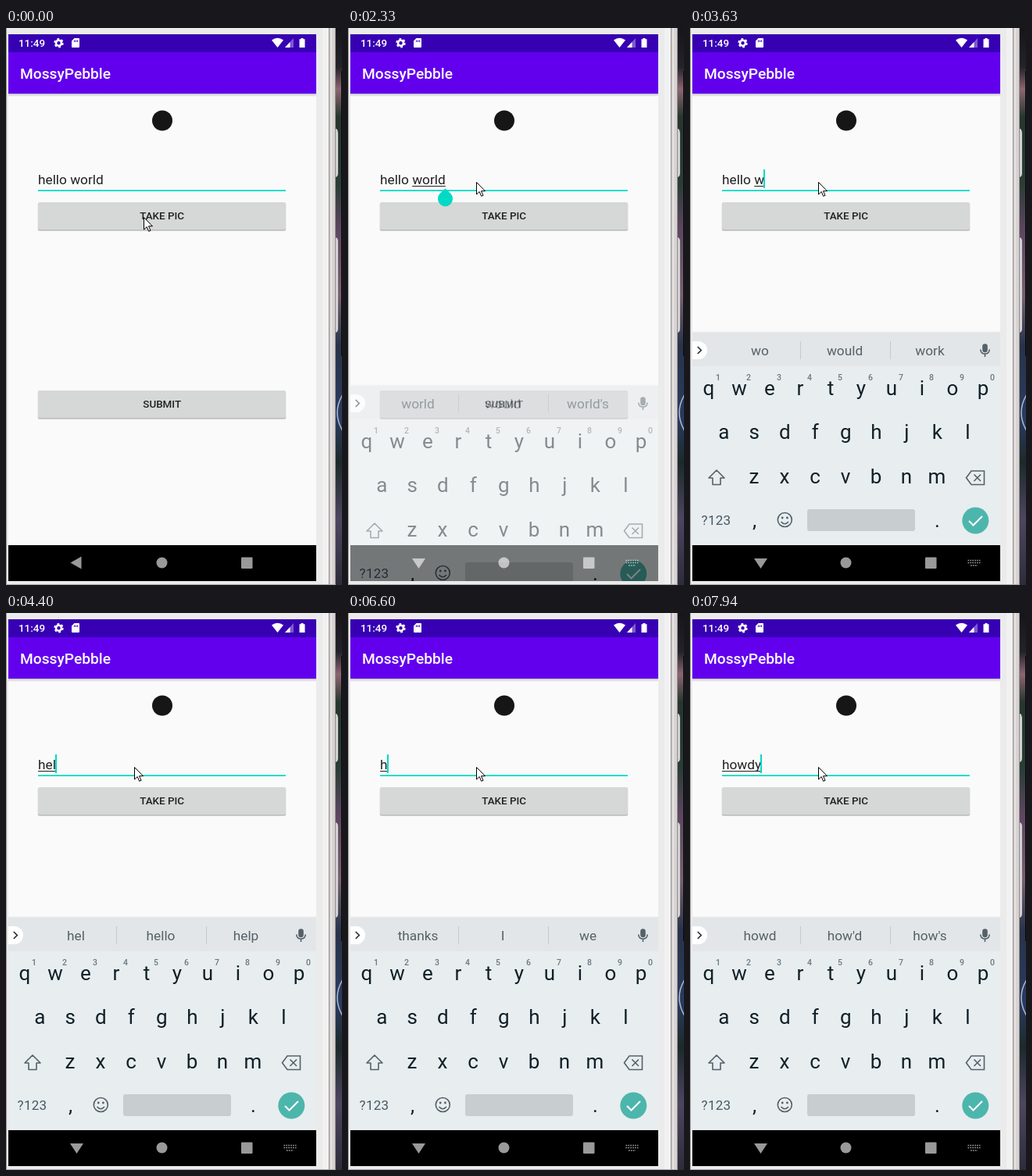
An HTML page that plays this animation: 430x713 px, repeating every 8000 ms.

```html
<!DOCTYPE html>
<html lang="en">
<head>
<meta charset="utf-8">
<title>Caption typing</title>
<style>
  html, body { margin: 0; width: 100%; height: 100%; overflow: hidden; background: #ebebeb; }
  svg { position: absolute; left: 0; top: 0; font-family: Roboto, sans-serif; }
  #field {
    position: absolute; left: 41px; top: 182px; height: 24px; display: flex;
    font: 17.25px/24px Roboto, sans-serif; color: #212121; white-space: pre;
  }
  #field u { text-decoration: underline 1px; text-underline-offset: 1.5px; text-decoration-skip-ink: none; }
  #caret { width: 2px; height: 24px; margin: -1px -2px 0 -1px; background: #03dac5; }
  #hint { position: absolute; left: 0; color: #9a9a9a; }
  .medium { font-weight: 500; }
  .mid { text-anchor: middle; }
</style>
</head>
<body>
<svg width="430" height="713" viewBox="0 0 430 713">
  <defs>
    <clipPath id="screen"><path d="M3 8H397V708H3Z"/></clipPath>
    <linearGradient id="shade" x2="0" y2="1">
      <stop stop-color="#000" stop-opacity=".22"/><stop offset="1" stop-color="#000" stop-opacity="0"/>
    </linearGradient>
    <linearGradient id="photo" x2="0" y2="1">
      <stop stop-color="#17151a"/><stop offset=".07" stop-color="#23232a"/>
      <stop offset=".11" stop-color="#8c6672"/><stop offset=".16" stop-color="#26362f"/>
      <stop offset=".28" stop-color="#2a3d36"/><stop offset=".36" stop-color="#5c4660"/>
      <stop offset=".48" stop-color="#77616f"/><stop offset=".57" stop-color="#28334a"/>
      <stop offset=".7" stop-color="#2b3b5f"/><stop offset=".78" stop-color="#1c2a2b"/>
      <stop offset=".88" stop-color="#4d4660"/><stop offset="1" stop-color="#2d2c3b"/>
    </linearGradient>
    <g id="button">
      <rect x="40.5" y="1" width="318" height="36" rx="2" fill="#000" opacity=".1"/>
      <rect x="41" y=".8" width="317" height="35.6" rx="2" fill="#000" opacity=".16"/>
      <rect x="41" width="317" height="35" rx="2" fill="#d6d7d7"/>
    </g>
  </defs>

  <!-- window frame and desktop strip -->
  <path d="M0 0H430V713H0Z" fill="#ebebeb"/>
  <path d="M0 0H1V713H0Z" fill="#9c9c9c"/>
  <path d="M405 0H413V713H405Z" fill="#f1f1f1"/>
  <path d="M413 0H422V713H413Z" fill="#d8d3d3"/>
  <path d="M413.5 0V713M421.5 0V713" stroke="#918b8b"/>
  <path d="M416.5 0V713" stroke="#eeeaea"/>
  <path d="M422 0H430V713H422Z" fill="url(#photo)"/>
  <path d="M422 129h1q2 2 2 5v52q0 4-3 5ZM422 268q3 1 3 5v112q0 4-3 5Z" fill="#d2d0d3"/>
  <path d="M429.5 55V420" stroke="#08080a"/>
  <path d="M431 469Q417 492 431 516" fill="none" stroke="#a9b9d4" stroke-width="1.5"/>
  <path d="M0 712.5H422" stroke="#a5a5a5"/>

  <g clip-path="url(#screen)">
    <path d="M3 8H397V662H3Z" fill="#fafafa"/>
    <path d="M3 84H397V88H3Z" fill="url(#shade)"/>
    <path d="M3 31H397V84H3Z" fill="#6200ee"/>
    <path d="M3 8H397V31H3Z" fill="#3700b3"/>
    <g fill="#fff">
      <text class="medium" x="16" y="24.3" font-size="13.4">11:49</text>
      <g fill="none" stroke="#fff">
        <circle cx="67.5" cy="19.2" r="3.5" stroke-width="2.6"/>
        <circle cx="67.5" cy="19.2" r="5.3" stroke-width="1.8" stroke-dasharray="2.8 2.75"/>
      </g>
      <path fill-rule="evenodd" d="M87.5 13H93q1 0 1 1V24q0 1-1 1H85q-1 0-1-1V16.500ZM87 15.500v2.500h1v-2.500ZM89 15.500v2.500h1v-2.500ZM91 15.500v2.500h1v-2.500Z"/>
      <path d="M340 15.500Q347.500 10 355 15.500L347.500 25Z"/>
      <path d="M368 13V25H357Z" opacity=".35"/>
      <path d="M363.500 18V25H357Z"/>
      <path d="M377.500 13H380.500V14.300H382.500V25H375.500V14.300H377.500Z"/>
      <text class="medium" x="18" y="65" font-size="19.17">MossyPebble</text>
    </g>

    <circle cx="200" cy="118.500" r="13" fill="#161616"/>
    <path d="M41 207.200H358V209H41Z" fill="#03dac5"/>
    <use href="#button" y="223"/>
    <use href="#button" y="464"/>
    <g class="medium mid" font-size="13.42" fill="#212121">
      <text x="199.700" y="245.300">TAKE PIC</text>
      <text x="199.700" y="486.300">SUBMIT</text>
    </g>
    <path id="handle" d="M124.500 205.500L131.500 212A9.600 9.600 0 1 1 117.500 212Z" fill="#03dac5"/>

    <path d="M3 662H397V708H3Z"/>
    <g id="keyboard">
      <path d="M3 388H397V391H3Z" fill="url(#shade)" transform="matrix(1 0 0 -1 0 779)" opacity=".5"/>
      <path d="M3 391H397V662H3Z" fill="#e8edf0"/>
      <path d="M3 391H397V433H3Z" fill="#e3e6e8"/>
      <path d="M141.500 401V424M256.500 401V424" stroke="#c4c9cc"/>
      <path d="M3 401H10.500A11.500 11.500 0 0 1 10.500 424H3Z" fill="#fff"/>
      <path d="M9.800 408L14.300 412.500L9.800 417" fill="none" stroke="#263238" stroke-width="1.700"/>
      <g fill="none" stroke="#546168" stroke-width="1.600">
        <rect x="375" y="405" width="5" height="9.500" rx="2.500" fill="#546168"/>
        <path d="M371.800 411.500Q372 417 377.500 417T383.200 411.500M377.500 417V421"/>
        <path d="M34 566L44 576H39V584.500H29V576H24Z" stroke-linejoin="round"/>
        <path d="M360 567H376.500V584.500H360L353.500 575.700Z M363.500 571.500L372 580M372 571.500L363.500 580"/>
        <circle cx="121.300" cy="629.500" r="9"/>
        <path d="M116.500 632Q121.300 637.500 126 632"/>
      </g>
      <g fill="#546168"><circle cx="118.200" cy="627" r="1.400"/><circle cx="124.400" cy="627" r="1.400"/></g>
      <rect x="150" y="616" width="138" height="28" rx="3" fill="#c8cdd0"/>
      <circle cx="365.300" cy="630.500" r="17" fill="#4db6ac"/>
      <path d="M357 631L362.500 636.500L374 625" fill="none" stroke="#fff" stroke-width="2"/>
      <text class="mid" x="33.500" y="636" font-size="17" fill="#455a64" style="letter-spacing:.3px">?123</text>
      <g id="words" class="mid" font-size="17.25" fill="#546168"></g>
      <g id="keys" class="mid" font-size="26" fill="#102027"></g>
      <g id="digits" class="mid medium" font-size="10.5" fill="#6b787e"></g>
    </g>

    <g fill="#fff" opacity=".6">
      <path id="back"/>
      <circle cx="199.500" cy="684.500" r="7"/>
      <rect x="301" y="677.500" width="14.500" height="14.500" rx="1"/>
      <path id="switcher" d="M355.500 681.500H371.500M355.500 684.500H371.500M359 688H368" stroke="#fff" stroke-width="1.600" stroke-dasharray="1.700 1.200"/>
    </g>
  </g>
</svg>

<div id="field"><span id="hint">Description...</span><span id="plain"></span><u id="active"></u><i id="caret"></i></div>

<svg width="430" height="713" viewBox="0 0 430 713">
  <path id="mouse" d="M.5 .5V16L4.200 12.500L6.700 18.300L9 17.300L6.500 11.700H11.500Z" fill="#fff" stroke="#000"/>
</svg>

<script>
const LOOP = 8000;
const $ = id => document.getElementById(id);

function addText(parent, x, y, text = '') {
  const el = document.createElementNS('http://www.w3.org/2000/svg', 'text');
  el.setAttribute('x', x);
  el.setAttribute('y', y);
  el.textContent = text;
  return $(parent).appendChild(el);
}

function addRow(parent, letters, x, y) {
  [...letters].forEach((c, i) => addText(parent, x + i * 39, y, c));
}

addRow('keys', 'qwertyuiop', 24, 470);
addRow('keys', 'asdfghjkl', 43.3, 526);
addRow('keys', 'zxcvbnm', 82, 582.5);
addText('keys', 82.5, 639, ',');
addText('keys', 316.5, 639, '.');
addRow('digits', '1234567890', 36, 451);
const slots = [89.5, 198, 307].map(x => addText('words', x, 419));

// [time, changes]; "|" in text starts the underlined word, slide is [offset, opacity]
const steps = [
  [0, { text: 'hello world|', caret: 0, mouse: [176, 242], handle: 0, slide: [0, 0], words: 'world would world\'s' }],
  [400, { caret: 1 }],
  [770, { mouse: [175, 198] }],
  [920, { caret: 0, mouse: [175, 197] }],
  [1590, { mouse: [164, 197] }],
  [1710, { caret: 1, handle: 1 }],
  [1830, { text: 'hello |world' }],
  [2210, { caret: 0, slide: [96, .15] }],
  [2330, { slide: [68, .5] }],
  [2450, { slide: [30, .8] }],
  [2570, { slide: [6, .97] }],
  [2690, { caret: 1, slide: [0, 1] }],
  [3120, { caret: 0, handle: .5 }],
  [3240, { handle: 0 }],
  [3390, { text: 'hello |worl', caret: 1 }],
  [3510, { text: 'hello |wo', words: 'wo would work' }],
  [3630, { text: 'hello |w' }],
  [3750, { text: 'hello |', words: 'w with would' }],
  [3900, { text: '|hello' }],
  [4020, { words: 'hello hey hello\'s' }],
  [4140, { text: '|hell' }],
  [4400, { text: '|hel', words: 'hel hello help' }],
  [4640, { text: '|he' }],
  [4760, { words: 'he hey her' }],
  [4900, { text: '|h' }],
  [5020, { words: 'h hi how' }],
  [5390, { caret: 0 }],
  [5640, { text: '|', caret: 1 }],
  [5760, { words: 'thanks I we' }],
  [6040, { caret: 0 }],
  [6600, { text: '|h', caret: 1 }],
  [6750, { words: 'h hi how' }],
  [7030, { caret: 0 }],
  [7280, { text: '|ho', caret: 1 }],
  [7430, { text: '|how', words: 'ho how hope' }],
  [7570, { words: 'how however how\'s' }],
  [7820, { text: '|howd', words: 'howd how\'d how\'s' }],
  [7940, { text: '|howdy' }]
];

function draw(t) {
  const s = Object.assign({}, ...steps.filter(([at]) => at <= t).map(step => step[1]));
  const [plain, active] = s.text.split('|');
  const [offset, alpha] = s.slide;
  $('plain').textContent = plain;
  $('active').textContent = active;
  $('hint').style.opacity = plain || active ? 0 : 1;
  $('caret').style.opacity = s.caret;
  $('handle').style.opacity = s.handle;
  $('mouse').setAttribute('transform', `translate(${s.mouse})`);
  $('keyboard').setAttribute('transform', `translate(0 ${offset})`);
  $('keyboard').style.opacity = alpha;
  $('switcher').style.opacity = alpha ? 1 : 0;
  $('back').setAttribute('d', alpha ? 'M82 679H99L90.500 692Z' : 'M96.500 676.500V692.500L82.500 684.500Z');
  s.words.split(' ').forEach((word, i) => slots[i].textContent = word);
}

const start = performance.now();
function tick() {
  draw((performance.now() - start) % LOOP);
  requestAnimationFrame(tick);
}
tick();
</script>
</body>
</html>
```
